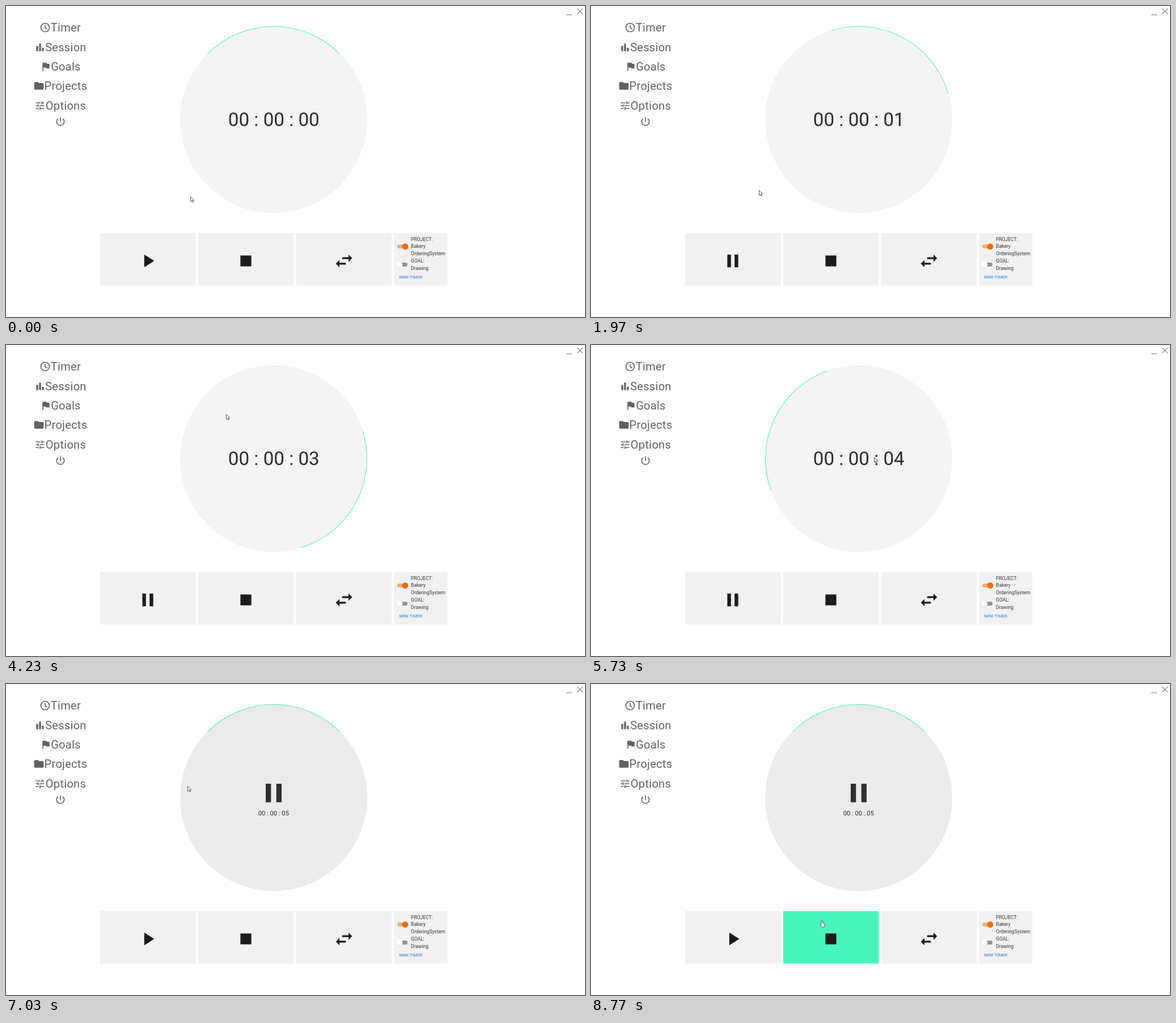
An HTML page for the animation above (8960 ms loop, 1021 px wide and 549 px high).

```html
<!DOCTYPE html>
<html lang="en">
<head>
<meta charset="utf-8">
<title>Timer</title>
<style>
  html, body { margin: 0; width: 100%; height: 100%; overflow: hidden; background: #fff; }
  body { position: relative; font-family: Roboto, sans-serif; }
  .stage { position: absolute; left: 0; top: 0; width: 1021px; height: 549px; }
  nav { position: absolute; left: 0; top: 21px; width: 191.4px; color: #616161; font-size: 20px; letter-spacing: .3px; }
  nav div { display: flex; justify-content: center; align-items: center; height: 34.4px; }
  nav div:last-child { height: 23px; }
  nav svg { width: 20px; height: 20px; margin-right: -.5px; fill: currentColor; }
  nav svg.line { fill: none; stroke: currentColor; stroke-width: 2; }
  .clock { text-anchor: middle; fill: #2c2c2c; }
  .panel { fill: #333; font-size: 8.5px; }
  .icon { fill: #1c1c1c; }
  .tile { fill: #f1f1f1; }
  .tile.hover { fill: #48f5bf; }
  .cursor { fill: #fff; stroke: #444; stroke-width: .9; stroke-linejoin: round; }
</style>
</head>
<body>
<svg class="stage" viewBox="0 0 1021 549">
  <path d="M988 15.5h10M1007 4.5l10 10m0-10l-10 10" fill="none" stroke="#999" stroke-width="1.6"/>

  <circle id="disc" cx="472" cy="200.5" r="165"/>
  <circle id="arc" cx="472" cy="200.5" r="164.4" pathLength="4" stroke-dasharray="1 3"
          fill="none" stroke="#6cf0ca" stroke-width="1.3"/>
  <text id="bigClock" class="clock" x="472.3" y="212.4" font-size="33.2"></text>
  <g id="pausedView">
    <path d="M458 176h9.3v32.7H458zm18.7 0h9.3v32.7h-9.3z" fill="#303030"/>
    <text id="smallClock" class="clock" x="471.8" y="231.6" font-size="11.2"></text>
  </g>

  <g id="tiles"></g>
  <g class="icon">
    <path id="playIcon" d="M243.8 438.8v22.4l17.6-11.2z"/>
    <path id="pauseIcon" d="M240.4 438.8h6.4v22.4h-6.4zm12.8 0h6.4v22.4h-6.4z"/>
    <path d="M413.4 440.4h19.2v19.2h-19.2z"/>
    <path d="M588 448.4l-6.4 6.4 6.4 6.4v-4.8h11.2v-3.2H588zM610.4 445.2l-6.4-6.4v4.8h-11.2v3.2H604v4.8z"/>
  </g>

  <rect x="690" y="421" width="17" height="7" rx="3.5" fill="#f5ad72"/>
  <circle cx="704" cy="424.6" r="5.4" fill="#ee6c0a"/>
  <rect x="692" y="453" width="16" height="7" rx="3.5" fill="#919191"/>
  <circle cx="693.8" cy="457.1" r="5.6" fill="#d9d9d9"/>
  <circle cx="693.8" cy="456.5" r="5.3" fill="#fff"/>
  <g id="panel" class="panel"></g>
  <text id="mini" x="693.4" y="481.2" font-size="7.7">MINI TIMER</text>

  <g id="cursor" class="cursor">
    <path id="arrow" d="M.5.5v9l2-2 1.5 3 1.3-.6-1.4-3h2.8z"/>
    <path id="hand" d="M-1 7V1q1-1.4 2 0v3.4l3.4.8q1 .4.8 1.6l-1.4 5.6H0L-2.9 8q.3-1.6 1.9-.4z"/>
  </g>
</svg>

<nav>
  <div><svg class="line" viewBox="0 0 24 24"><circle cx="12" cy="12" r="9"/><path d="M12 7v5.5l4.5 2.7"/></svg>Timer</div>
  <div><svg viewBox="0 0 24 24"><path d="M4 9h4v11H4zM10 4h4v16h-4zM16 13h4v7h-4z"/></svg>Session</div>
  <div><svg viewBox="0 0 24 24"><path d="M14.4 6L14 4H5v17h2v-7h5.6l.4 2h7V6z"/></svg>Goals</div>
  <div><svg viewBox="0 0 24 24"><path d="M10 4H4q-2 0-2 2v12q0 2 2 2h16q2 0 2-2V8q0-2-2-2h-8z"/></svg>Projects</div>
  <div><svg class="line" viewBox="0 0 24 24"><path d="M3 6h10m3 0h5m-5-3v6M3 12h5m3 0h10M8 9v6M3 18h6m3 0h9m-9-3v6"/></svg>Options</div>
  <div><svg class="line" viewBox="0 0 24 24"><path d="M12 3v10M7 6a8 8 0 1 0 10 0"/></svg></div>
</nav>

<script>
const LOOP = 8960, START = 887, PAUSE = 6450, TURN = 1005;
const TILE = { x: 166, y: 401, width: 168.5, height: 92.5, step: 172.8 };
const $ = id => document.getElementById(id);
const show = (id, on) => $(id).setAttribute("display", on ? "inline" : "none");
const tileLeft = i => TILE.x + i * TILE.step;

$("tiles").innerHTML = [0, 1, 2, 3].map(i =>
  `<rect class="tile" x="${tileLeft(i)}" y="${TILE.y}" width="${i < 3 ? TILE.width : 94}" height="${TILE.height}"/>`
).join("");
const tiles = [...$("tiles").children];

$("panel").innerHTML = ["PROJECT:", "Bakery", "OrderingSystem", "GOAL:", "Drawing"]
  .map((line, i) => `<text x="714.1" y="${414.6 + 12.75 * i}">${line}</text>`).join("");

// Pointer stops: time, x, y
const stops = [
  [0, 325, 336], [530, 215, 428], [START, 215, 428], [1230, 183, 405], [1400, 150, 380],
  [2830, 515, 243], [4230, 388, 122], [5730, 499, 198], [6300, 255, 430], [6750, 150, 380],
  [7030, 320, 180], [7400, 410, 112], [7700, 470, 250], [8040, 525, 139], [8770, 407, 417]
];

function pointerAt(t) {
  const next = stops.findIndex(stop => stop[0] > t);
  if (next < 0) return stops.at(-1).slice(1);
  const [t0, x0, y0] = stops[next - 1], [t1, x1, y1] = stops[next];
  const p = (t - t0) / (t1 - t0);
  return [x0 + (x1 - x0) * p, y0 + (y1 - y0) * p];
}

function draw(t) {
  const paused = t >= PAUSE, running = t >= START && !paused;
  const elapsed = Math.max(0, Math.min(t, PAUSE) - START);
  const clock = `00 : 00 : 0${Math.floor(elapsed / 1000)}`;
  const turn = running ? 360 * elapsed / TURN : 0;

  $("disc").setAttribute("fill", paused ? "#ebebeb" : "#f4f4f4");
  $("arc").setAttribute("transform", `rotate(${turn - 135} 472 200.5)`);
  $("bigClock").textContent = $("smallClock").textContent = clock;
  show("bigClock", !paused);
  show("pausedView", paused);
  show("playIcon", !running);
  show("pauseIcon", running);
  $("mini").setAttribute("fill", running ? "#1f7fd9" : "#3b6fcb");

  const [x, y] = pointerAt(t).map(Math.round);
  const hovered = y < TILE.y ? -1
    : [0, 1, 2].findIndex(i => x >= tileLeft(i) && x < tileLeft(i) + TILE.width);
  tiles.forEach((tile, i) => tile.classList.toggle("hover", i === hovered));
  show("hand", hovered >= 0);
  show("arrow", hovered < 0);
  $("cursor").setAttribute("transform", `translate(${x} ${y})`);
}

const begin = performance.now();
function tick() {
  draw((performance.now() - begin) % LOOP);
  requestAnimationFrame(tick);
}
tick();
</script>
</body>
</html>
```
